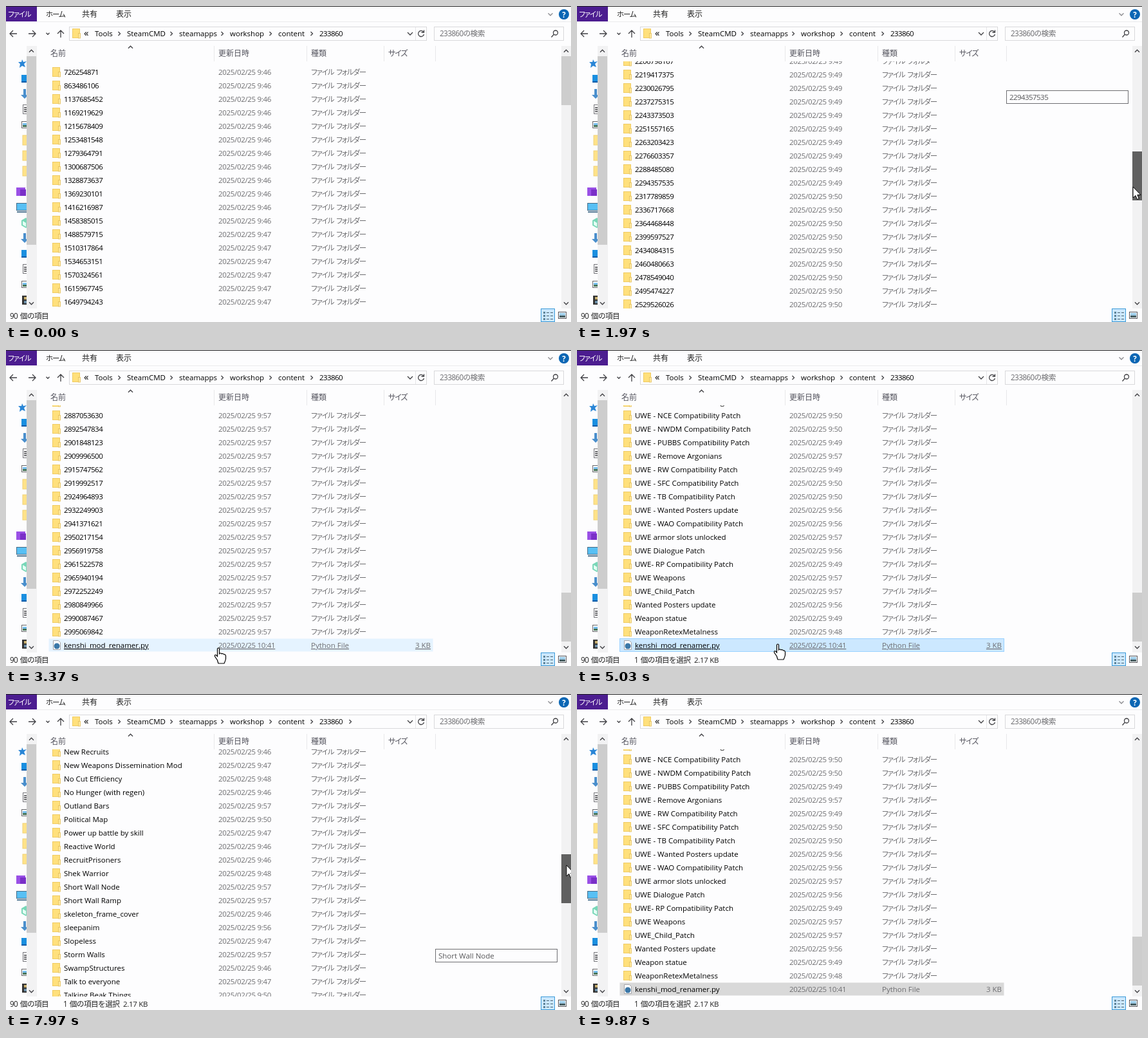
An HTML page that plays this animation: 878 by 491 pixels, repeating every 9.9 s.

```html
<!DOCTYPE html>
<html lang="ja">
<head>
<meta charset="utf-8">
<title>Folder rename</title>
<style>
html, body { margin: 0; width: 100%; height: 100%; overflow: hidden; background: #fdfdfe; }
svg { display: block; width: 878px; height: 491px; }
text { font: 11.5px 'Open Sans', 'Noto Sans CJK JP', 'Noto Sans CJK', sans-serif; fill: #000; white-space: pre; }
.num { letter-spacing: -.56px; }
.date { letter-spacing: -.32px; }
.soft { fill: #6d6d70; }
.tip { fill: #575759; }
.head { font-size: 12px; fill: #55555f; }
.dark { fill: #222; }
.kana { font-feature-settings: 'palt'; letter-spacing: -1.1px; word-spacing: 2px; }
.mix { font-size: 11.7px; letter-spacing: -.6px; word-spacing: 1.2px; }
.hot text { text-decoration: underline; }
.line { fill: none; stroke: #404044; stroke-width: 1.3; }
</style>
</head>
<body>
<svg id="stage" viewBox="0 0 878 491"></svg>
<script>
const LOOP = 9900, FPS = 30, ROW = 21, COUNT = 90, MAX = 1513, TOP = 78, RANGE = 299, LAG = 15;
const ENTER = 300, GRAB = 1000, PAUSE = 1970, BOTTOM = 2800, DROP = 2950;
const SELECT = 3900, RENAME = 4500, CRUMB = 5600, SWING = 6528, SWING_END = 8391, BLUR = 9000;
const BG = '#fdfdfe', THUMB = '#cdcdcd', TRACK = '#f2f2f3';
const SCRIPT = 'kenshi_mod_renamer.py';
const stage = document.getElementById('stage');

const smooth = k => k * k * (3 - 2 * k);

// interpolate [position, ...values] keys
function track(keys, t, ease = smooth) {
  const n = keys.findIndex(key => key[0] >= t);
  if (n === 0) return keys[0].slice(1);
  if (n < 0) return keys[keys.length - 1].slice(1);
  const a = keys[n - 1], b = keys[n], k = ease((t - a[0]) / (b[0] - a[0]));
  return a.slice(1).map((v, j) => v + (b[j + 1] - v) * k);
}

// folder ids rise between a few known points, with a little jitter
const idKeys = [[0, 726254871], [2, 1137685452], [17, 1649794243], [35, 2206798167],
  [44, 2294357535], [53, 2529526026], [72, 2887053630], [88, 2995069842]];
const ids = Array.from({ length: COUNT - 1 }, (_, i) => {
  const jitter = idKeys.some(key => key[0] === i) ? 0 : .4 * Math.sin(i * 5.3);
  return String(Math.round(track(idKeys, i + jitter, k => k)[0]));
});

const TIMES = ['9:46', '9:47', '9:48', '9:49', '9:50', '9:56', '9:57'];
const idTime = i => TIMES[[12, 21, 29, 45, 60, 67].filter(n => i >= n).length];

// the first letter of each name picks its time
const named = ('aActive Patrols|bAnimal Pens|aAttack Slots|cBandit Camps|dBetter Backpacks|aBetter Crop Fields|' +
  'bBigger Squads|eBlack Cloth Set|dBorder Towns|aCamp Lights|gCanyon Outposts|bCarry More|aClean Water|' +
  'cCompact Storage|dCrossbow Retexture|eDark Interface|aDesert Nomads|bDust Masks|gEasy Wall Gates|' +
  'aExtra Hairstyles|dFaction Colours|cFaster Research|aFlat Ground|bGarden Houses|eGuard Towers|' +
  'dHarvest Tools|aHidden Caves|gIron Fences|bItem Stacks|aJob Priority|cLarge Workshops|dLight Armour|' +
  'aLong Roads|eMap Markers|bMarket Stalls|gMetal Stairs|aMore Beds|dMountain Camps|cNew Doorways|' +
  'aNew Recruits|bNew Weapons Dissemination Mod|cNo Cut Efficiency|aNo Hunger (with regen)|gOutland Bars|' +
  'ePolitical Map|bPower up battle by skill|aReactive World|aRecruitPrisoners|cShek Warrior|gShort Wall Node|' +
  'gShort Wall Ramp|askeleton_frame_cover|fsleepanim|bSlopeless|gStorm Walls|aSwampStructures|bTalk to everyone|' +
  'eTalking Beak Things|aTameBeasties|eTilted Spotlight|dUniversal Wasteland Expansion|eUWE - AG-LFR~|' +
  'gUWE - AG-LFR-RA-Patch|dUWE - AO~|gUWE - Drifters are Real|eUWE - GenMod~|dUWE - Kaizo~|' +
  'eUWE - Legendary Weapons Compatibility...|dUWE - LW~|dUWE - MC~|dUWE - MCA~|gUWE - Mist Ghoul Hunting|' +
  'eUWE - NCE~|eUWE - NWDM~|dUWE - PUBBS~|gUWE - Remove Argonians|dUWE - RW~|eUWE - SFC~|eUWE - TB~|' +
  'fUWE - Wanted Posters update|fUWE - WAO~|gUWE armor slots unlocked|fUWE Dialogue Patch|dUWE- RP~|' +
  'gUWE Weapons|gUWE_Child_Patch|fWanted Posters update|dWeapon statue|cWeaponRetexMetalness')
  .replace(/~/g, ' Compatibility Patch').split('|')
  .map(s => ({ name: s.slice(1), time: TIMES['abcdefg'.indexOf(s[0])] }));

const rect = (x, y, w, h, fill, more = '') => `<rect x="${x}" y="${y}" width="${w}" height="${h}" fill="${fill}" ${more}/>`;
const text = (x, y, s, cls = '', more = '') => `<text x="${x}" y="${y}" class="${cls}" ${more}>${s}</text>`;
const path = (d, more = '') => `<path class="line" d="${d}" ${more}/>`;
const shape = (d, fill, more = '') => `<path d="${d}" fill="${fill}" ${more}/>`;
const chev = (x, y, turn, r = 3.5, more = '') =>
  path(`M${-r} ${r / 2}l${r} ${-r}l${r} ${r}`, `transform="translate(${x} ${y}) rotate(${turn})" ${more}`);
const folder = (x, y) => rect(x + .5, y + .5, 11, 14, '#ffe07c', 'stroke="#f0cb62"') +
  rect(x + 9.5, y + 7.5, 3, 7.5, '#ffeaa0', 'stroke="#e3be5c" stroke-width=".8"');

// sidebar icons, drawn around y = 0
const icons = {
  star: shape('M25-6l2 4 5-1-4 4 2 5-5-2-4 3 1-6-3-3 5 0z', '#2a86d6'),
  desk: rect(24, -6, 12, 12, '#1a8fe0') + rect(24, 4, 12, 2, '#0b5ca8'),
  down: shape('M27-8h4v9h4l-6 6-6-6h4z', '#4a8fcc'),
  doc: rect(26.5, -7.5, 10, 14, BG, 'stroke="#77777c"') + path('M28-3h6M28 0h6M28 3h6', 'stroke-width=".8"'),
  pic: rect(24.5, -5.5, 12, 10, BG, 'stroke="#66666a"') + rect(26, -3, 9, 3, '#78bfee') + rect(26, 0, 9, 3, '#487458'),
  fold: rect(26, -8, 10, 15, '#ffe28a', 'stroke="#f0d274"'),
  box: rect(16, -7, 14, 13, '#9a50e6') + rect(22, -4, 9, 10, '#7a30c8'),
  pc: rect(16.5, -6.5, 18, 11, '#58c0f4', 'stroke="#456b86"') + rect(17, 6, 16, 2, '#557994'),
  cube: shape('M24-4l7-4 6 4v8l-6 4-7-4z', '#79d7b8') + shape('M26-3l5 3v6l-5-3z', '#e3fff4'),
  film: rect(25, -7, 12, 14, '#333') + rect(28, -5, 9, 4, '#c8b070') + rect(28, 1, 9, 4, '#6c8fa8')
};
const side = 'star desk down doc pic fold fold fold box pc cube down desk doc pic film'.split(' ')
  .map((k, i) => `<g transform="translate(0 ${89 + 24 * i + (i > 7 ? 8 : 0)})">${icons[k]}</g>`).join('');

const stamp = time => '2025/02/25 ' + time;
function rowMarkup(name, i) {
  const y = 103 + i * ROW, base = y + 4, last = name === SCRIPT;
  const icon = last
    ? shape(`M73.500 ${y - 7.5}h8l3 3v11h-11z`, BG, 'stroke="#a4a4a8"') + `<circle cx="79" cy="${y + 1}" r="4.500" fill="#3b78a8"/>`
    : folder(72, y - 8);
  const kind = last
    ? text(474, base, 'Python File', 'soft') + text(660, base, '3 KB', 'soft', 'text-anchor="end"')
    : text(474, base, 'ファイル フォルダー', 'kana soft');
  return `<g>${rect(66.5, y - 10.5, 597, 20, 'none')}${icon}${text(90, base, name, last ? '' : 'num')}` +
    `${text(330, base, stamp(last ? '10:41' : idTime(i)), 'date soft')}${kind}</g>`;
}

const crumbs = [[138, 'Tools', 176], [188, 'SteamCMD', 257], [269, 'steamapps', 336],
  [348, 'workshop', 411], [423, 'content', 475]]
  .map(([x, s, c]) => text(x, 47, s) + chev(c, 43, 90, 3)).join('');

const scrollbar = (x, w) => rect(x, 62, w, 408, TRACK) +
  chev(x + 7.5, 70, 0, 3.5, 'stroke-width="1.7"') + chev(x + 7.5, 462, 180, 3.5, 'stroke-width="1.7"');

stage.innerHTML = `
<defs><clipPath id="list"><rect x="52" y="86" width="811" height="384"/></clipPath>
<clipPath id="nav"><rect x="0" y="62" width="32" height="408"/></clipPath></defs>
${rect(0, 0, 878, 491, BG)}
${rect(0, 0, 878, 1, '#222224')}${rect(0, 1, 48, 23, '#4c1d90')}${rect(48, 24, 830, 1, '#ebebed')}
${text(3, 17, 'ファイル', 'kana', 'style="fill:#fff"')}${text(62, 17, 'ホーム', 'kana dark')}
${text(118, 17, '共有', 'head dark')}${text(171, 17, '表示', 'head dark')}
${chev(846, 13, 180, 3.5, 'style="stroke:#8b8b90"')}
<circle cx="867" cy="13" r="8" fill="#0b66b4"/>${text(867, 17.5, '?', '', 'text-anchor="middle" style="fill:#fff;font-weight:700"')}
${path('M17 43H6m5-5l-5 5 5 5M35 43h11m-5-5l5 5-5 5M85 49V38m-5 5l5-5 5 5', 'stroke-width="1.5"')}
${chev(65, 43, 180, 2.5)}
${rect(98.5, 32.5, 555, 21, 'none', 'stroke="#d9d9db"')}${rect(665.5, 32.5, 201, 21, 'none', 'stroke="#d9d9db"')}
${rect(636, 33, 1, 20, '#e6e6e8')}${folder(103, 35)}${text(121, 47, '«', '', 'style="font-size:15px"')}${crumbs}
${text(487, 47, '233860', 'num')}<g id="crumb">${chev(535, 43, 90, 3)}</g>
${chev(628, 43, 180, 4, 'stroke-width="1.6"')}
${path('M648.500 40a4.500 4.500 0 1 0 1 4M649.500 37.500v3.500h-4')}
${text(674, 47, '233860の検索', 'mix soft')}
<circle class="line" cx="854" cy="41.500" r="3.500"/>${path('M851.500 44l-4 4.500', 'stroke-width="1.8"')}
${text(69, 78, '名前', 'head')}${text(330, 78, '更新日時', 'head')}${text(474, 78, '種類', 'head')}${text(594, 78, 'サイズ', 'head kana')}
${[323, 467, 587, 667].map(x => rect(x, 62, 1, 24, '#e8e8ea')).join('')}
${chev(193.5, 64, 0, 3.5, 'stroke-width="1"')}
<g clip-path="url(#nav)">${side}</g>
${scrollbar(32, 16)}${rect(32, TOP, 15, 293, THUMB)}
<g clip-path="url(#list)"><g id="rows">${[...ids, SCRIPT].map(rowMarkup).join('')}</g></g>
${scrollbar(863, 15)}${rect(863, TOP, 15, 76, THUMB, 'id="thumb"')}
${text(6, 486, '90 個の項目', 'mix dark')}
<g id="picked">${text(89, 486, '1 個の項目を選択', 'mix dark')}${text(182, 486, '2.17 KB', 'date dark')}</g>
${rect(831.5, 470.5, 21, 20, '#cce8ff', 'stroke="#3a9ad8"')}
${[475, 480, 485].map(y => rect(835, y, 3, 3, '#5f8496') + rect(840, y + 1, 4, 1, '#4c6470') + rect(846, y + 1, 4, 1, '#4c6470')).join('')}
${rect(858.5, 475.5, 12, 10, BG, 'stroke="#55555a"')}${rect(860, 477, 9, 4, '#9dcce8')}${rect(860, 481, 9, 3, '#465c60')}
<g id="tip">${rect(667.5, .5, 189, 20, BG, 'stroke="#6e6e72"')}${text(672, 15, '')}</g>
${shape('M0 0V17L4 13.500 6.500 19.500 9.300 18.300 6.800 12.500H12Z', '#fff', 'id="arrow" stroke="#000"')}
${shape('M-1.500 1Q0-1 1.500 1V9Q3 7 5 9Q7 8 8.500 10Q11 9.500 11.500 12V17Q11 20 9 24H0Q-1 21-1.500 19L-5.500 13Q-6 10-3.500 11L-1.500 13Z', '#fff', 'id="hand" stroke="#000" stroke-width="1.200"')}`;

const el = id => document.getElementById(id);
const show = (node, on) => node.setAttribute('visibility', on ? 'visible' : 'hidden');
const move = (node, x, y) => node.setAttribute('transform', `translate(${x} ${y})`);
const rowNodes = [...el('rows').children];
const tipText = el('tip').querySelector('text');

const downKeys = [[GRAB, TOP], [PAUSE, 226.8], [BOTTOM, TOP + RANGE]];
const cursorKeys = [[ENTER, 700, 330], [GRAB, 868, 133], [PAUSE, 864, 281], [BOTTOM, 867, 432], [DROP, 867, 432],
  [3350, 330, 463], [4200, 330, 463], [5000, 312, 457], [5250, 312, 457],
  [6050, 857, 393], [SWING, 857, 393], [SWING_END, 873, 393], [BLUR, 760, 495]];
const swinging = t => t >= SWING && t < SWING_END;

// first drag goes down, the second swings up to the top and back
function thumbAt(t) {
  if (!swinging(t)) return track(downKeys, t)[0];
  const turn = 2 * Math.PI * (t - SWING) / (SWING_END - SWING);
  return TOP + RANGE * (1 + Math.cos(turn)) / 2;
}

function cursorAt(t) {
  const [x, y] = track(cursorKeys, t);
  return [x, swinging(t) ? thumbAt(t) + 16 : y];
}

let renamed = false;
function fillNames(on) {
  if (on === renamed) return;
  renamed = on;
  named.forEach((item, i) => {
    const [name, date] = rowNodes[i].querySelectorAll('text');
    name.textContent = on ? item.name : ids[i];
    name.setAttribute('class', on ? '' : 'num');
    date.textContent = stamp(on ? item.time : idTime(i));
  });
}

function draw(t) {
  fillNames(t >= RENAME);
  const thumb = thumbAt(t);
  const scroll = Math.round((thumbAt(t - LAG) - TOP) / RANGE * MAX);
  move(el('rows'), 0, -scroll);

  const [x, y] = cursorAt(t);
  const here = t >= ENTER && t < BLUR;
  const first = t >= GRAB && t < DROP;
  const dragging = first || swinging(t);
  const inList = here && !dragging && x > 66 && x < 663 && y > 86 && y < 470;
  const hover = inList ? Math.floor((y + scroll - 92.5) / ROW) : -1;
  const picked = t >= SELECT, blurred = t >= BLUR;

  rowNodes.forEach((row, i) => {
    const chosen = picked && i === COUNT - 1, hot = i === hover;
    const box = row.firstChild;
    box.setAttribute('fill', chosen ? (blurred ? '#d9d9d9' : '#cce8ff') : hot ? '#e5f3ff' : 'none');
    box.setAttribute('stroke', chosen && hot ? '#99d1ff' : 'none');
    row.setAttribute('class', hot ? 'hot' : '');
  });

  const over = here && x >= 863 && y >= thumb && y <= thumb + 76;
  el('thumb').setAttribute('y', Math.floor(thumb));
  el('thumb').setAttribute('fill', dragging ? '#606060' : over ? '#a6a6a6' : THUMB);

  show(el('tip'), dragging);
  const top = Math.min(COUNT - 1, Math.floor(scroll / MAX * COUNT));
  tipText.textContent = top === COUNT - 1 ? SCRIPT : renamed ? named[top].name : ids[top];
  tipText.setAttribute('class', renamed ? 'tip' : 'num tip');
  move(el('tip'), 0, first ? 131 : 396);

  show(el('crumb'), t >= CRUMB && !blurred);
  show(el('picked'), picked);
  show(el('arrow'), here && !inList);
  show(el('hand'), inList);
  move(el('arrow'), x, y);
  move(el('hand'), x, y);
}

function tick() {
  const t = performance.now() % LOOP;
  const step = Math.floor((t + 5) * FPS / 1000);
  draw(Math.round(step * 100 / FPS) * 10);
  requestAnimationFrame(tick);
}
tick();
</script>
</body>
</html>
```
